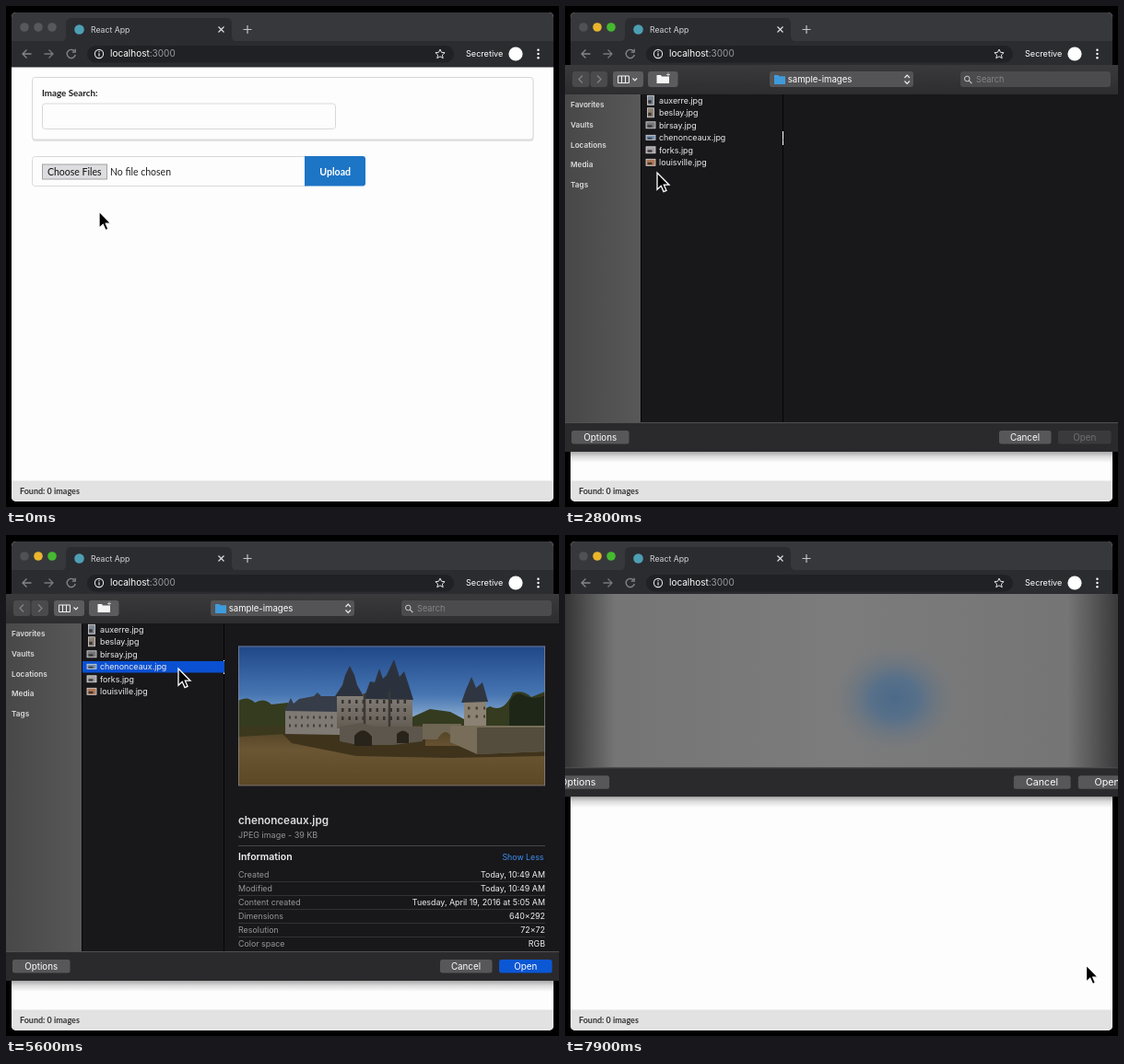
Animation, 600 px wide and 544 px high, one loop 8000 ms. Source, as an HTML page:

```html
<!DOCTYPE html>
<html lang="en">
<head>
<meta charset="utf-8">
<title>File upload</title>
<style>
html, body { margin: 0; width: 100%; height: 100%; overflow: hidden; background: #000; }
svg { display: block; width: 600px; height: 544px; font-family: Inter, Roboto, sans-serif; }
.lato { font-family: Lato, sans-serif; }
</style>
</head>
<body>
<svg id="stage" viewBox="0 0 600 544"></svg>
<script>
const rect = (x, y, w, h, fill, r = 0, more = '') =>
  `<rect x="${x}" y="${y}" width="${w}" height="${h}" fill="${fill}" rx="${r}" ${more}/>`;
const text = (x, y, s, size, fill = '#fff', more = '') =>
  `<text x="${x}" y="${y}" font-size="${size}" fill="${fill}" ${more}>${s}</text>`;
const line = (d, stroke, w = 1, more = '') =>
  `<path d="${d}" fill="none" stroke="${stroke}" stroke-width="${w}" ${more}/>`;
const shape = (d, fill) => `<path d="${d}" fill="${fill}"/>`;
const circle = (x, y, r, fill, more = '') => `<circle cx="${x}" cy="${y}" r="${r}" fill="${fill}" ${more}/>`;
const group = (id, s, more = '') => `<g id="${id}" ${more}>${s}</g>`;
const gradient = (id, stops, across) =>
  `<linearGradient id="${id}" x2="${across ? 1 : 0}" y2="${across ? 0 : 1}">` +
  stops.map(([o, c, a = 1]) => `<stop offset="${o}" stop-color="${c}" stop-opacity="${a}"/>`).join('') +
  '</linearGradient>';

const bold = 'font-weight="700"', semi = 'font-weight="600"';
const middle = 'text-anchor="middle"', end = 'text-anchor="end"';

const defs = '<defs>' +
  gradient('bar', [[0, '#3a393b'], [1, '#2d2c2e']]) +
  gradient('side', [[0, '#484848'], [1, '#585858']], true) +
  gradient('shade', [[0, '#000', .34], [.45, '#000', .13], [1, '#000', 0]]) +
  gradient('sky', [[0, '#1f4788'], [.35, '#4776b3'], [.56, '#9ab7d3']]) +
  gradient('river', [[0, '#4d3f24'], [.4, '#6b5633'], [1, '#5c4726']]) +
  gradient('stone', [[0, '#85807a'], [1, '#625b52']]) +
  gradient('blur', [[0, '#353434'], [.09, '#757575'], [.5, '#7c7c7c'], [.91, '#757575'], [1, '#3a3939']], true) +
  '<radialGradient id="blob"><stop stop-color="#4c6a89"/><stop offset=".35" stop-color="#587089"/>' +
  '<stop offset="1" stop-color="#7b7b7b" stop-opacity="0"/></radialGradient>' +
  '<clipPath id="below"><path d="M0 64H600V544H0Z"/></clipPath>' +
  '<clipPath id="win"><rect x="6" y="7" width="588" height="531" rx="5"/></clipPath></defs>';

const browser = () => group('browser',
  rect(6, 7, 588, 531, '#fefdfe') +
  rect(6, 7, 588, 32, '#37383c', 0, 'id="frame"') +
  shape('M58 39Q65 39 65 32V19Q65 13 71 13H239Q245 13 245 19V32Q245 39 252 39Z', '#2b2c30') +
  rect(6, 38, 588, 28.5, '#2b2c30') +
  [20, 35, 50].map(x => circle(x, 23, 4.8, '#57585b', 'class="light"')).join('') +
  circle(79.5, 25.5, 5.3, '#4d9fb4') +
  text(92, 28.7, 'React App', 8.7, '#d4d5d8') +
  line('M230.5 22.5l6 6m0-6l-6 6', '#dddee0', 1.2) +
  line('M257.5 25.5h9m-4.5-4.5v9', '#c4c5c8', 1.2) +
  rect(88, 43, 398, 18.5, '#1f2124', 9.2) +
  line('M27.5 52h-9.5m4.5-4.5l-4.5 4.5l4.5 4.5', '#85868a', 1.3, 'class="nav"') +
  line('M41.5 52h9.5m-4.5-4.5l4.5 4.5l-4.5 4.5', '#77787c', 1.3) +
  line('M74.5 49.2A4.6 4.6 0 1 0 75.3 53', '#85868a', 1.3, 'class="nav"') +
  line('M75.2 46.8v3.4h-3.4', '#85868a', 1.3, 'class="nav"') +
  circle(101, 52, 4.6, 'none', 'stroke="#e4e5e7" stroke-width="1.1"') +
  line('M101 51.2v3.4m0-5.6v1.2', '#e4e5e7', 1.2) +
  text(113, 55.4, 'localhost<tspan fill="#9a9ba0">:3000</tspan>', 10) +
  line('M471 47l1.5 3.3l3.6.4l-2.7 2.4l.8 3.6l-3.2-1.9l-3.2 1.9l.8-3.6l-2.7-2.4l3.6-.4Z', '#e4e5e7') +
  text(499, 55.3, 'Secretive', 9.1) +
  circle(553, 52, 7.6, '#fff') +
  [47.7, 52, 56.3].map(y => circle(577.5, y, 1.2, '#fff')).join('') +
  page(), 'clip-path="url(#win)"');

const page = () => '<g class="lato">' +
  rect(28.5, 79, 544, 68, '#e4e3e5', 3) +
  rect(28.5, 77.5, 543.5, 67.5, '#fefdfe', 3, 'stroke="#d6d6d8"') +
  text(39, 98.3, 'Image Search:', 9.8, '#1d1d1e', bold) +
  rect(39.5, 106, 318, 27.5, '#fefdfe', 3, 'stroke="#d8d8da"') +
  rect(28.5, 163.5, 300, 32, '#fefdfe', 3, 'stroke="#d8d8da"') +
  shape('M324 163H387Q390 163 390 166V192.5Q390 195.5 387 195.5H324Z', '#1d75c6') +
  text(357.2, 183.5, 'Upload', 10.6, '#fff', bold + middle) +
  rect(39.5, 172, 70, 16, '#dddcde', 0, 'id="choose" stroke="#a3a2a4"') +
  text(45, 183.6, 'Choose Files', 10.5, '#111') +
  text(113, 183.6, 'No file chosen', 10.5, '#222') +
  rect(6, 515.5, 588, 23, '#e2e2e3') +
  text(15, 529.8, 'Found: 0 images', 9, '#333', bold) + '</g>';

const toolbar = () =>
  rect(0, 64, 600, 32, 'url(#bar)') +
  rect(8, 71, 18.5, 17, '#4a494b', 3) + rect(27.5, 71, 18.5, 17, '#4a494b', 3) +
  line('M19 75.5l-4 4l4 4M35 75.5l4 4l-4 4', '#858486', 1.2) +
  rect(52, 71, 33, 17, '#5c5b5d', 3) +
  line('M57.5 76h12v7.5h-12ZM61.5 76v7.5m4-7.5v7.5', '#f0f0f0') +
  line('M73.5 78.5l2.3 2.3l2.3-2.3', '#f0f0f0', 1.2) +
  rect(90, 71, 32.5, 17, '#5c5b5d', 3) +
  shape('M99.5 75h4.5l1 1.5h8V84h-13.5Z', '#f4f4f4') + line('M110 74.5h4M112 72.5v4', '#c8c8c8') +
  rect(222, 71, 156, 17, '#545355', 3) +
  shape('M227 75h4.5l1 1.2h6.5V85H227Z', '#3e9bdc') +
  text(241.7, 83.2, 'sample-images', 9.6) +
  line('M368.5 78l2.7-2.8l2.7 2.8m-5.4 3.5l2.7 2.8l2.7-2.8', '#f0f0f0', 1.2) +
  rect(429, 71, 163, 17, '#4b4a4c', 3) +
  circle(436.3, 79, 2.8, 'none', 'stroke="#cfcfcf"') + line('M438.4 81.1l3 3', '#cfcfcf', 1.2) +
  text(446, 83, 'Search', 9.2, '#858487');

const files = ['auxerre', 'beslay', 'birsay', 'chenonceaux', 'forks', 'louisville'];
const thumbs = ['#7d8794', '#8c8072', '#77767a', '#6f8eae', '#a3a1a5', '#b07858'];
const fileList = () =>
  rect(82, 96, 154, 356, '#18171a') +
  rect(82, 137, 155, 12.5, '#0a50d2', 0, 'id="chosen"') +
  files.map((name, i) => {
    const y = 102.3 + 13.5 * i, w = i < 2 ? 7 : 10, h = i < 2 ? 10 : i === 3 ? 5 : 7;
    return rect(93 - w / 2, y - h / 2, w, h, thumbs[i], 0, 'stroke="#d8d8d8" stroke-width=".8"') +
      rect(92 - w / 4, y, w / 2, h / 3, '#3c3634') +
      text(102, y + 3.2, name + '.jpg', 8.9, '#ececec');
  }).join('');

const photo = () =>
  rect(252, 120.5, 333, 151.5, 'url(#sky)') +
  shape('M252 180Q262 174 270 182Q280 176 288 184L306 182V210H252ZM440 198L460 189L482 192L497 200L525 186Q540 194 550 171Q562 168 570 176L585 170V212H440Z', '#343b1f') +
  shape('M546 210V182Q552 168 562 174T585 174V210Z', '#1e2717') +
  rect(252, 207, 333, 65, 'url(#river)') +
  shape('M252 207H304V216L252 219Z', '#3b381e') +
  shape('M300 216H455V229H585V240L480 242L380 240L310 226Z', '#3f331c') +
  shape('M303 189H362V217L303 216Z', '#7f7a73') +
  shape('M302 191L309 177L312 183L318 178L334 175L338 171L342 175H362V192Z', '#363c48') +
  line('M307 198h52m-52 9h52', '#403e3d', 3, 'stroke-dasharray="2 4.5"') +
  shape('M359 172H387L390 176H441V210H359Z', 'url(#stone)') +
  shape('M357 175L365 163L368 152L373 142L378 152L381 163L388 175ZM388 178L395 159L400 160L405 145L409 156L413 152L421 135L427 154L432 148L437 163L442 179Z', '#2c323d') +
  line('M364 181h74m-74 9h74m-74 9h74', '#37332f', 4, 'stroke-dasharray="2.5 5"') +
  line('M389 172V208M416 170V208', '#3b3835', 2.5) +
  shape('M362 208L385 204L400 208H452V224L420 228H382L362 224Z', '#5c564c') +
  shape('M378 229V218Q388 206 397 219V229ZM424 226V216Q431 209 437 216V226Z', '#28231b') +
  shape('M452 222V205H494V224H486Q478 205 468 222Z', '#6e6552') +
  shape('M497 180H521V209H497Z', '#8b8273') +
  shape('M494 182L499 168L505 154L510 166L517 160L523 181Z', '#2f3641') +
  line('M501 188h19m-19 9h19', '#484239', 3, 'stroke-dasharray="2.5 6"') +
  shape('M482 207H585V235L511 238L482 225Z', '#776d58') +
  shape('M511 209H585V235L511 238Z', '#544c3d') +
  rect(252.5, 121, 332, 151, 'none', 0, 'stroke="#8c8b8d" stroke-opacity=".7"');

const facts = [
  ['Created', 'Today, 10:49 AM'], ['Modified', 'Today, 10:49 AM'],
  ['Content created', 'Tuesday, April 19, 2016 at 5:05 AM'],
  ['Dimensions', '640×292'], ['Resolution', '72×72'], ['Color space', 'RGB']];
const preview = () => group('preview', photo() +
  text(252, 314.3, 'chenonceaux.jpg', 11.7, '#dcdcdc', semi) +
  text(252, 329.3, 'JPEG image - 39 KB', 9, '#939295') +
  line('M252 337.5H585', '#464548') +
  text(252, 352.8, 'Information', 10.5, '#f2f2f2', semi) +
  text(583.5, 352.5, 'Show Less', 8.8, '#3d8ef2', end) +
  facts.map(([k, v], i) => {
    const y = 372.3 + 15 * i;
    return text(252, y, k, 8.9, '#98979a') + text(585, y, v, 8.9, '#efefef', end) +
      (i < 5 ? line(`M252 ${y + 4.2}H585`, '#323134') : '');
  }).join(''));

const content = () => group('content', toolbar() +
  rect(0, 96, 82, 357, 'url(#side)') +
  ['Favorites', 'Vaults', 'Locations', 'Media', 'Tags'].map((s, i) =>
    text(6, 110 + 21.8 * i, s, 8.2, '#dadada', semi)).join('') +
  rect(237, 96, 363, 356, '#18171a') + fileList() +
  line('M82.5 96V452M236.5 96V136M236.5 151V452', '#050505') + preview());

// Stand-in bodies while the sheet slides; drawn 194 units high
const sliding = () =>
  group('opening', rect(0, 0, 600, 194, '#1a1a1b') +
    shape('M0 0H84Q68 4 62 34Q59 110 62 194H0Z', '#282828') +
    line('M84 0Q68 4 62 34Q59 110 62 194M238 0Q230 16 230.5 60V194', '#000', 1.2)) +
  group('closing', rect(0, 0, 600, 194, 'url(#blur)') +
    '<ellipse cx="358" cy="117" rx="74" ry="66" fill="url(#blob)"/>');

const footer = () => group('footer',
  rect(0, 484, 600, 12, 'url(#shade)') +
  rect(0, 452, 600, 32, '#2a292b') + line('M0 452.5H600', '#515053') +
  rect(7, 461, 62.5, 14.5, '#575658', 2.5) + text(38.2, 471.7, 'Options', 9.8, '#fff', middle) +
  rect(471, 461, 56.5, 14.5, '#575658', 2.5) + text(499, 471.7, 'Cancel', 9.8, '#fff', middle) +
  rect(535, 461, 57.5, 14.5, '#3a393b', 2.5, 'id="open"') +
  text(563.7, 471.7, 'Open', 9.8, '#fff', middle + ' id="openText"'));

const arrow = '<path id="cursor" d="M0 0V18.2L4.2 14.3L7 20.6L10 19.3L7.3 13.2H13Z" fill="#000" stroke="#fff" stroke-width="1.3"/>';

stage.innerHTML = defs + browser() +
  group('sheet', group('body', sliding()) + content() + footer(), 'clip-path="url(#below)"') + arrow;

const el = id => document.getElementById(id);
const set = (id, name, value) => el(id).setAttribute(name, value);
const show = (id, on) => set(id, 'visibility', on ? 'inherit' : 'hidden');
const smooth = (t, from, length) => {
  const u = Math.min(1, Math.max(0, (t - from) / length));
  return u * u * (3 - 2 * u);
};

// time, x, y
const path = [
  [0, 101, 223], [50, 101, 223], [200, 95, 180.5], [1900, 95, 180.5], [2500, 100, 181],
  [2800, 100, 181], [3500, 184, 149], [3700, 187, 145], [5700, 187, 145],
  [6400, 486, 452.5], [6800, 560, 464], [7200, 565.5, 467], [8000, 565.5, 467]];
function cursorAt(t) {
  const i = path.findIndex(k => k[0] > t);
  const [t0, x0, y0] = path[i - 1], [t1, x1, y1] = path[i];
  const u = smooth(t, t0, t1 - t0);
  return [x0 + (x1 - x0) * u, y0 + (y1 - y0) * u];
}

function draw(t) {
  const active = t >= 700 && t < 2100, closing = t >= 7800;
  const p = smooth(t, 1650, 480) * (1 - smooth(t, 7750, 310));
  const wide = 1 + .195 * (1 - p);
  const full = p === 1;

  set('frame', 'fill', active ? '#1b1c1f' : '#37383c');
  const lights = t < 700 ? ['#57585b', '#57585b', '#57585b']
    : [t < 1700 ? '#ee5c54' : '#505154', '#e8b52c', '#45b92f'];
  document.querySelectorAll('.light').forEach((e, i) => e.setAttribute('fill', lights[i]));
  document.querySelectorAll('.nav').forEach(e => e.setAttribute('stroke', active ? '#fff' : '#85868a'));
  set('choose', 'fill', t >= 1100 && t < 1400 ? '#cfced0' : '#dddcde');

  show('sheet', p > 0);
  show('content', full);
  show('opening', p > 0 && !full && !closing);
  show('closing', closing);
  set('body', 'transform', `translate(0 64) scale(1 ${Math.max(0, 388 + 420 * (p - 1)) / 194})`);
  set('footer', 'transform', `translate(${300 * (1 - wide)} ${420 * (p - 1)}) scale(${wide} 1)`);
  show('chosen', full && t >= 4200);
  const ready = t >= 4300;
  show('preview', full && ready);
  set('open', 'fill', closing ? '#575658' : ready ? '#0b57d4' : '#3a393b');
  set('openText', 'fill', ready ? '#fff' : '#706f72');
  set('cursor', 'transform', `translate(${cursorAt(t)})`);
}

const start = performance.now();
function tick() {
  draw(Math.floor((performance.now() - start) % 8000 / 100) * 100);
  requestAnimationFrame(tick);
}
tick();
</script>
</body>
</html>
```
